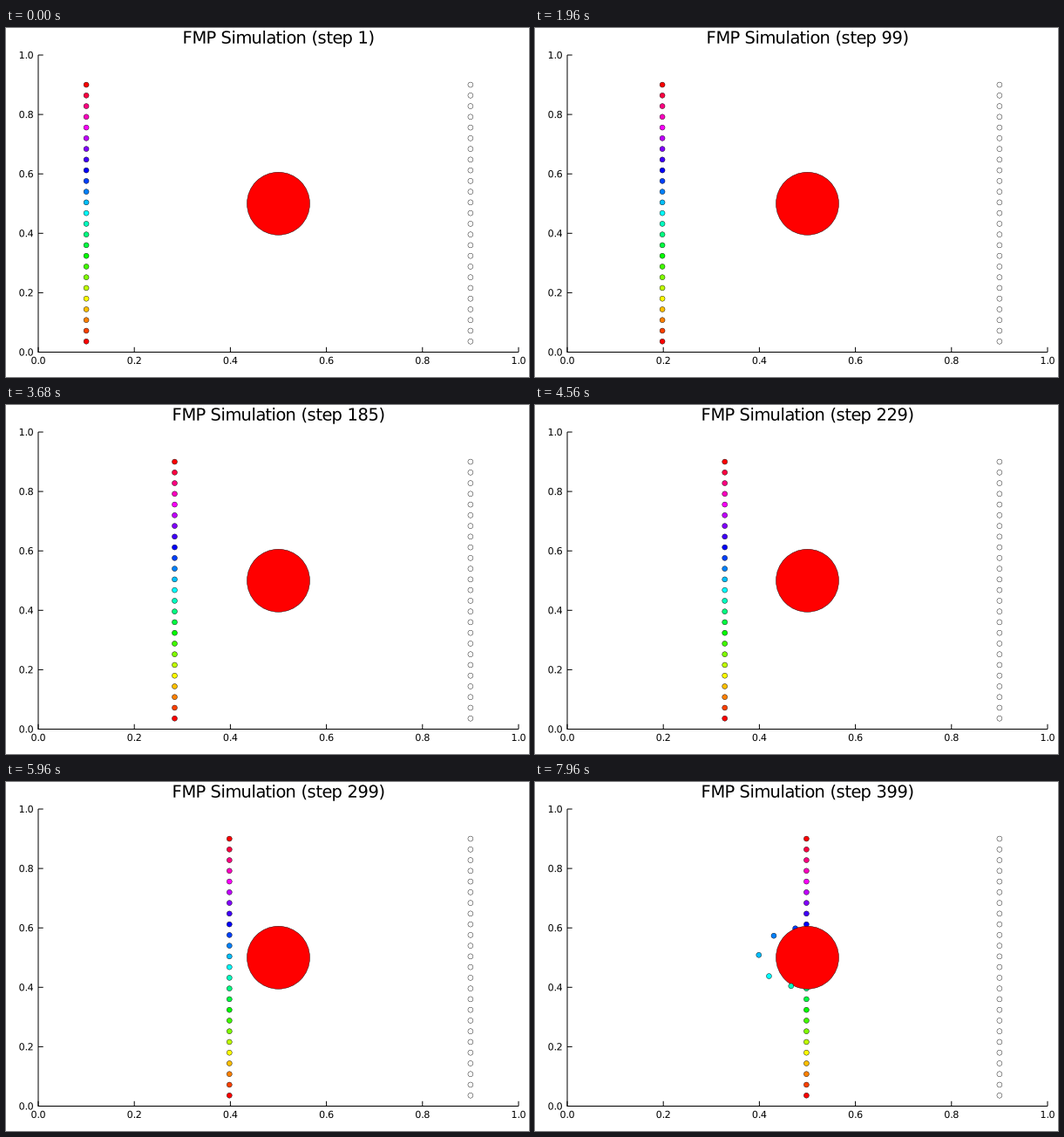
Write a matplotlib script that moves like this. It is 600x400 px and loops after 8000 ms.

```python
import colorsys
import math

import matplotlib.pyplot as plt
from matplotlib.animation import FuncAnimation
from matplotlib.patches import Circle, PathPatch
from matplotlib.path import Path
from matplotlib.textpath import TextPath

W, H, DPI = 600, 400, 100
PT = 72 / DPI                      # points per pixel
X0, Y0, SX, SY = 37, 371.5, 551, 340.5
FRAMES, INTERVAL = 200, 40

N = 25                             # agents
SPEED = 0.001                      # distance per step
START, GOAL, CENTER = 0.1, 0.9, 0.5
REACH = 0.1015                     # closest distance to the obstacle centre
DRAG = 0.86                        # slowdown while sliding round it
FRONT = 11                         # agent drawn above the obstacle

TITLE, TICK = 14 / PT, 8 / PT      # font sizes in pixels

plt.rcParams["font.family"] = "DejaVu Sans"


def px(x):
    return X0 + SX * x


def py(y):
    return Y0 - SY * y


def path(y, steps):
    """Positions of one agent: straight ahead, then sliding round the obstacle."""
    dy = y - CENTER
    if abs(dy) >= REACH:
        return [(START + SPEED * s, y) for s in range(steps)]
    angle = math.asin(abs(dy) / REACH)
    side = math.copysign(1, dy)
    touch = CENTER - REACH * math.cos(angle)
    points = []
    for s in range(steps):
        x = START + SPEED * s
        if x <= touch:
            points.append((x, y))
            continue
        step = min(1, (x - touch) / SPEED)
        rise = REACH * math.sin(angle) - abs(dy)
        pull = math.atan2(rise, GOAL - CENTER + REACH * math.cos(angle))
        angle += step * DRAG * SPEED / REACH * math.sin(angle - pull)
        points.append((CENTER - REACH * math.cos(angle),
                       CENTER + side * REACH * math.sin(angle)))
    return points


glyphs = {}


def glyph(char, size):
    """Outline of a character and its advance, cut to whole pixels."""
    if (char, size) not in glyphs:
        def right(s):
            return TextPath((0, 0), s, size=size).get_extents().x1
        advance = math.floor(right(f"|{char}|") - right("||"))
        glyphs[char, size] = TextPath((0, 0), char, size=size), advance
    return glyphs[char, size]


def outline(x, y, text, size, align):
    parts = [glyph(c, size) for c in text]
    x -= align * sum(advance for _, advance in parts)
    shapes = []
    for shape, advance in parts:
        if len(shape.vertices):
            shapes.append(Path(shape.vertices * (1, -1) + (x, y), shape.codes))
        x += advance
    return Path.make_compound_path(*shapes)


fig = plt.figure(figsize=(W / DPI, H / DPI), dpi=DPI, facecolor="white")
ax = fig.add_axes([0, 0, 1, 1])
ax.set_xlim(0, W)
ax.set_ylim(H, 0)
ax.axis("off")


def line(xs, ys):
    ax.plot(xs, ys, color="black", lw=PT, snap=False, solid_capstyle="butt")


def disc(x, y, r, color, z):
    return ax.add_patch(Circle((px(x), py(y)), r, facecolor=color,
                               edgecolor="black", lw=0.42 * PT, zorder=z))


def label(x, y, text, size, align=0.5):
    return ax.add_patch(PathPatch(outline(x, y, text, size, align),
                                  facecolor="black", lw=0, snap=False))


def heading(step):
    return px(0.5), 17.7, f"FMP Simulation (step {step})", TITLE, 0.5


line([px(0), px(0)], [py(1), py(0) + 0.5])
line([px(0), px(1)], [py(0), py(0)])
for k in range(6):
    v = k / 5
    line([px(v), px(v)], [py(0), py(0) - 5.7])
    line([px(0), px(0) + 5.7], [py(v), py(v)])
    label(px(v), 385, f"{v:.1f}", TICK)
    label(31.6, py(v) + 4, f"{v:.1f}", TICK, 1)

title = label(*heading(1))

heights = [0.9 * (i + 1) / N for i in range(N)]
paths = [path(y, 2 * FRAMES) for y in heights]
for y in heights:
    disc(GOAL, y, 2.95, "white", 3)
disc(CENTER, CENTER, 36, "red", 5)
agents = [disc(START, y, 2.95, colorsys.hsv_to_rgb(i / (N - 1) % 1, 1, 1),
               6 if i == FRONT else 4)
          for i, y in enumerate(heights)]


def draw(frame):
    s = 2 * frame
    title.set_path(outline(*heading(s + 1)))
    for agent, points in zip(agents, paths):
        x, y = points[s]
        agent.center = px(x), py(y)
    return [title, *agents]


anim = FuncAnimation(fig, draw, frames=FRAMES, interval=INTERVAL,
                     repeat=True, repeat_delay=0)
plt.show()
```
